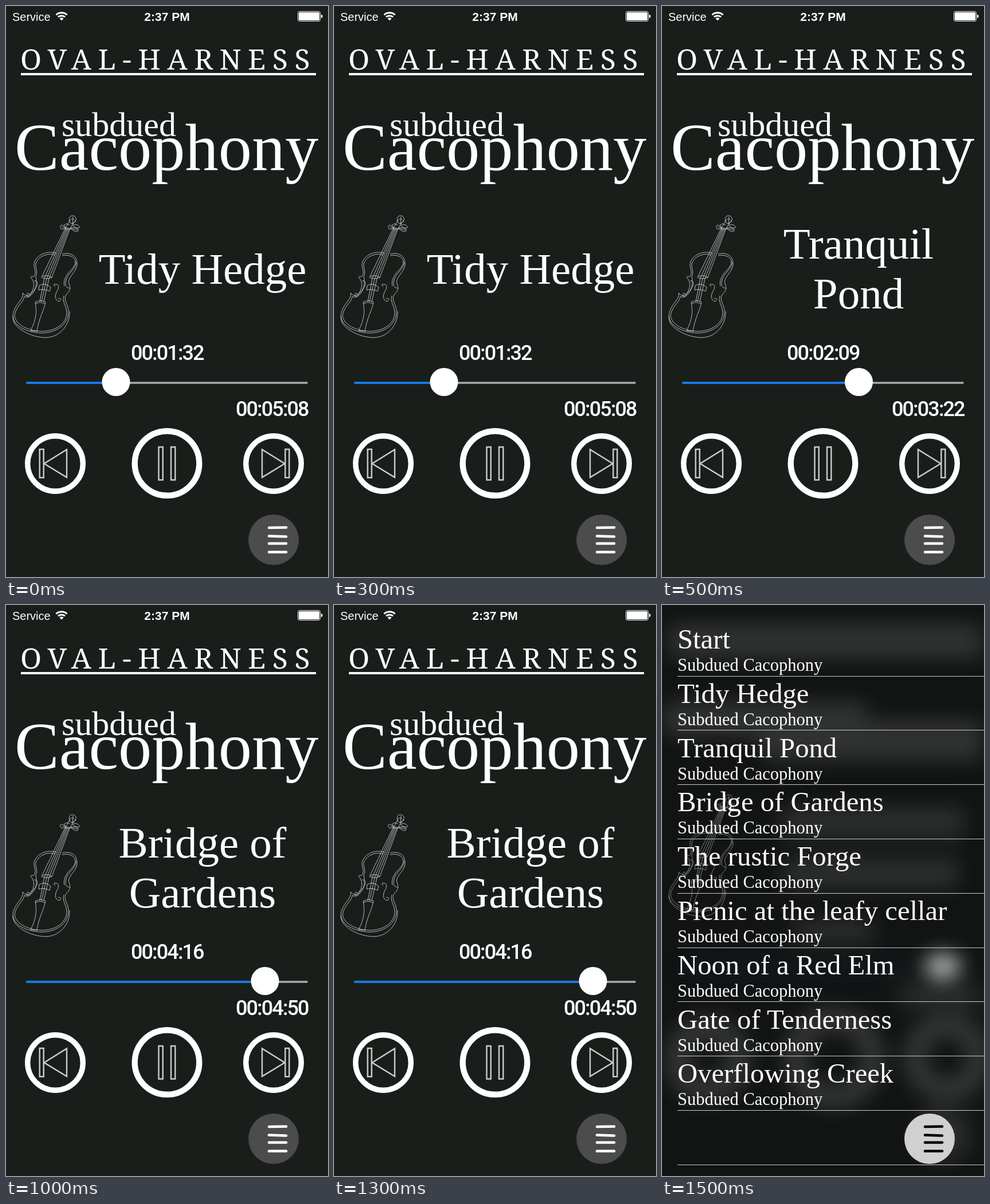
An HTML page that plays this animation: 562x997 px, repeating every 2000 ms.

```html
<!DOCTYPE html>
<html lang="en">
<head>
<meta charset="utf-8">
<title>Music player</title>
<style>
  html, body { margin: 0; width: 100%; height: 100%; overflow: hidden; background: #1a1e1b; }
  svg { display: block; width: 100vw; height: 100vh; }
  text { fill: #fff; font-family: "Liberation Serif", serif; }
  .sans { font-family: "Liberation Sans", sans-serif; }
  .band { font: 500 50px "Noto Serif", serif; letter-spacing: 11.5px; }
  .clock { font: 500 36px Roboto, sans-serif; letter-spacing: -1.9px; }
  .song { font-size: 77px; text-anchor: middle; }
  .row { font-size: 48.7px; }
  .album { font-size: 30.5px; }
  .line { fill: none; stroke: #fff; }
  .icon { fill: none; stroke: #ccc; stroke-width: 2.4; }
</style>
</head>
<body>
<svg viewBox="0 0 562 997" preserveAspectRatio="none">
  <defs>
    <filter id="blur" x="-50%" y="-50%" width="200%" height="200%"><feGaussianBlur stdDeviation="17"/></filter>
    <g id="violin" class="line" stroke-width=".9" stroke-opacity=".75" stroke-linejoin="round">
      <!-- body, inner edge and ribs -->
      <path d="M88 432C74 426 53 434 49 449C48 457 53 462 50 470C48 475 44 470 43 474C50 480 50 492 45 499C40 507 35 508 29 501C32 512 14 521 12 540C12 560 38 570 62 571C88 571 108 556 109 536C110 522 100 515 104 506C106 501 111 500 112 492C106 494 102 488 105 478C108 466 122 460 123 446C124 436 110 429 98 433"/>
      <path d="M86 435C74 430 56 437 52 450C51 458 56 463 52 472C54 484 53 494 47 501C42 508 37 510 32 507C31 517 16 526 15 541C17 557 39 567 62 568C86 568 105 555 106 537C106 523 97 516 101 506M102 489C100 481 103 474 108 467C114 460 121 455 121 446C120 438 109 433 98 436"/>
      <path d="M12 542C10 562 44 579 70 579C95 578 112 556 111 533M124 447C126 462 112 468 109 481L112 491"/>
      <!-- neck, strings, bridge and tailpiece -->
      <path d="M103 389L62 474Q72 478 80 474L111 390ZM105 389L67 475L59 516M107 389L71 476L62 516M109 390L75 476L66 516M64 472Q73 469 80 474M58 488Q67 482 78 491L76 498Q66 493 57 496Z"/>
      <path d="M51 517Q60 512 69 517C65 535 57 546 54 568L43 567C53 546 54 535 51 517ZM51 520Q60 515 68 520"/>
      <!-- sound holes -->
      <path d="M49 480C58 479 55 489 50 495C42 503 42 508 37 507C34 502 40 499 41 504M84 486C92 484 94 491 89 498C85 505 85 513 92 516C98 515 95 508 91 511M86 490Q82 487 84 486"/>
      <!-- scroll and pegs -->
      <path d="M103 390L111 375C107 366 119 363 122 370C124 378 114 383 111 377C111 371 118 370 119 374M111 391L116 381L122 374M117 368L116 381M104 387C99 392 93 389 95 384C98 381 102 384 104 387M111 382C105 379 100 381 103 385M113 388C119 395 127 396 126 390C122 386 117 387 113 388M116 383C121 380 128 382 128 387C123 389 119 386 116 383M98 386L125 391"/>
    </g>
    <g id="skip">
      <circle class="line" r="48.3" stroke-width="9.4"/>
      <path class="icon" d="M-19.500 0L20 -24.500V24ZM-27.300 -25H-20.300V24.500H-27.300Z"/>
    </g>
  </defs>

  <rect width="562" height="997" fill="#1a1e1b"/>
  <g id="player">
    <text class="sans" x="11" y="25.5" font-size="20">Service</text>
    <g class="line">
      <path d="M87.500 15.500A14 14 0 0 1 106.500 15.500M91 19.200A9 9 0 0 1 103 19.200" stroke-width="3"/>
      <path d="M97 25.500L93.500 22A5 5 0 0 1 100.500 22Z" fill="#fff" stroke="none"/>
      <rect x="509.500" y="9.500" width="39" height="17" rx="3"/>
    </g>
    <text class="sans" x="281" y="25.500" font-size="21" font-weight="700" text-anchor="middle">2:37 PM</text>
    <rect x="511" y="11" width="36" height="14" rx="1.500" fill="#fff"/>
    <path d="M550 15Q552.500 15 552.500 18T550 21Z" fill="#fff"/>

    <text class="band" x="25" y="110.500">OVAL-HARNESS</text>
    <rect x="26" y="117" width="515" height="4" fill="#fff"/>
    <text x="97" y="227" font-size="60">subdued</text>
    <text x="15" y="286" font-size="116.500">Cacophony</text>
    <use href="#violin"/>
    <g id="song"></g>

    <text class="clock" id="elapsed" x="218" y="618"></text>
    <text class="clock" id="total" x="401" y="716"></text>
    <g class="line" stroke-width="3.6" stroke-linecap="round">
      <path d="M37 658H525" stroke="#aaa"/>
      <path id="progress" stroke="#0a78f5"/>
    </g>
    <circle id="thumb" cy="656.500" r="24.500" fill="#fff"/>

    <use href="#skip" x="86" y="799"/>
    <use href="#skip" transform="translate(467 799) scale(-1 1)"/>
    <circle class="line" cx="281" cy="798.500" r="56.300" stroke-width="10.400"/>
    <path class="icon" d="M266.500 770H273.800V827.500H266.500ZM288 770H295.300V827.500H288Z"/>
  </g>

  <g id="list">
    <rect width="562" height="997" fill="#111413"/>
    <g filter="url(#blur)" fill="#fff">
      <g opacity=".13">
        <rect x="10" y="32" width="550" height="62" rx="20"/>
        <rect x="0" y="168" width="360" height="62" rx="20"/>
        <rect x="170" y="200" width="390" height="72" rx="20"/>
      </g>
      <g opacity=".11">
        <rect x="205" y="352" width="325" height="56" rx="20"/>
        <rect x="210" y="440" width="310" height="56" rx="20"/>
        <rect x="230" y="550" width="140" height="40"/>
        <rect x="415" y="664" width="140" height="40"/>
      </g>
      <rect x="30" y="622" width="400" height="22" fill="#0a78f5" opacity=".07"/>
      <g class="line" stroke-width="40" opacity=".15">
        <circle cx="80" cy="793" r="54"/>
        <circle cx="300" cy="791" r="68"/>
        <circle cx="497" cy="790" r="56"/>
      </g>
      <circle cx="491" cy="924" r="50" opacity=".1"/>
      <ellipse cx="490" cy="631" rx="32" ry="23" opacity=".66"/>
    </g>
    <use href="#violin" y="-35" opacity=".65"/>
    <g id="rows"></g>
  </g>

  <circle id="menu" cx="467" cy="932" r="44"/>
  <path id="bars" d="M459 911L489 910.500M459 925.500L489 926.500M459 938.500H489M459 953.500H489" fill="none" stroke-width="4.600" stroke-linecap="round"/>
</svg>
<script>
  const $ = id => document.getElementById(id);
  const STEP = 500;
  const tracks = [
    { lines: ["Tidy Hedge"], elapsed: "00:01:32", total: "00:05:08", x: 192 },
    { lines: ["Tranquil", "Pond"], elapsed: "00:02:09", total: "00:03:22", x: 343.5 },
    { lines: ["Bridge of", "Gardens"], elapsed: "00:04:16", total: "00:04:50", x: 452 }
  ];
  const titles = ["Start", "Tidy Hedge", "Tranquil Pond", "Bridge of Gardens", "The rustic Forge",
    "Picnic at the leafy cellar", "Noon of a Red Elm", "Gate of Tenderness", "Overflowing Creek", ""];

  const label = (kind, x, y, words) => `<text class="${kind}" x="${x}" y="${y}">${words}</text>`;

  $("rows").innerHTML = titles.map((title, i) => {
    const y = i * 94.8;
    const words = title && label("row", 27, 76 + y, title) + label("album", 27, 115 + y, "Subdued Cacophony");
    return `${words}<rect x="27" y="${Math.round(123.6 + y)}" width="535" height="1" fill="#ccc"/>`;
  }).join("");

  function showTrack({ lines, elapsed, total, x }) {
    const top = lines.length > 1 ? 441 : 485;
    $("song").innerHTML = lines.map((words, i) => label("song", 343, top + i * 87, words)).join("");
    $("elapsed").textContent = elapsed;
    $("total").textContent = total;
    $("progress").setAttribute("d", `M37 658H${x}`);
    $("thumb").setAttribute("cx", x);
  }

  function show(scene) {
    const listOpen = scene === tracks.length;
    $("player").style.display = listOpen ? "none" : "";
    $("list").style.display = listOpen ? "" : "none";
    $("menu").setAttribute("fill", listOpen ? "#d0d0d0" : "#4b4c4b");
    $("bars").setAttribute("stroke", listOpen ? "#000" : "#fff");
    if (!listOpen) showTrack(tracks[scene]);
  }

  const start = performance.now();
  let shown = -1;
  function tick() {
    const scene = Math.floor((performance.now() - start) / STEP) % (tracks.length + 1);
    if (scene !== shown) show(shown = scene);
    requestAnimationFrame(tick);
  }
  tick();
</script>
</body>
</html>
```
